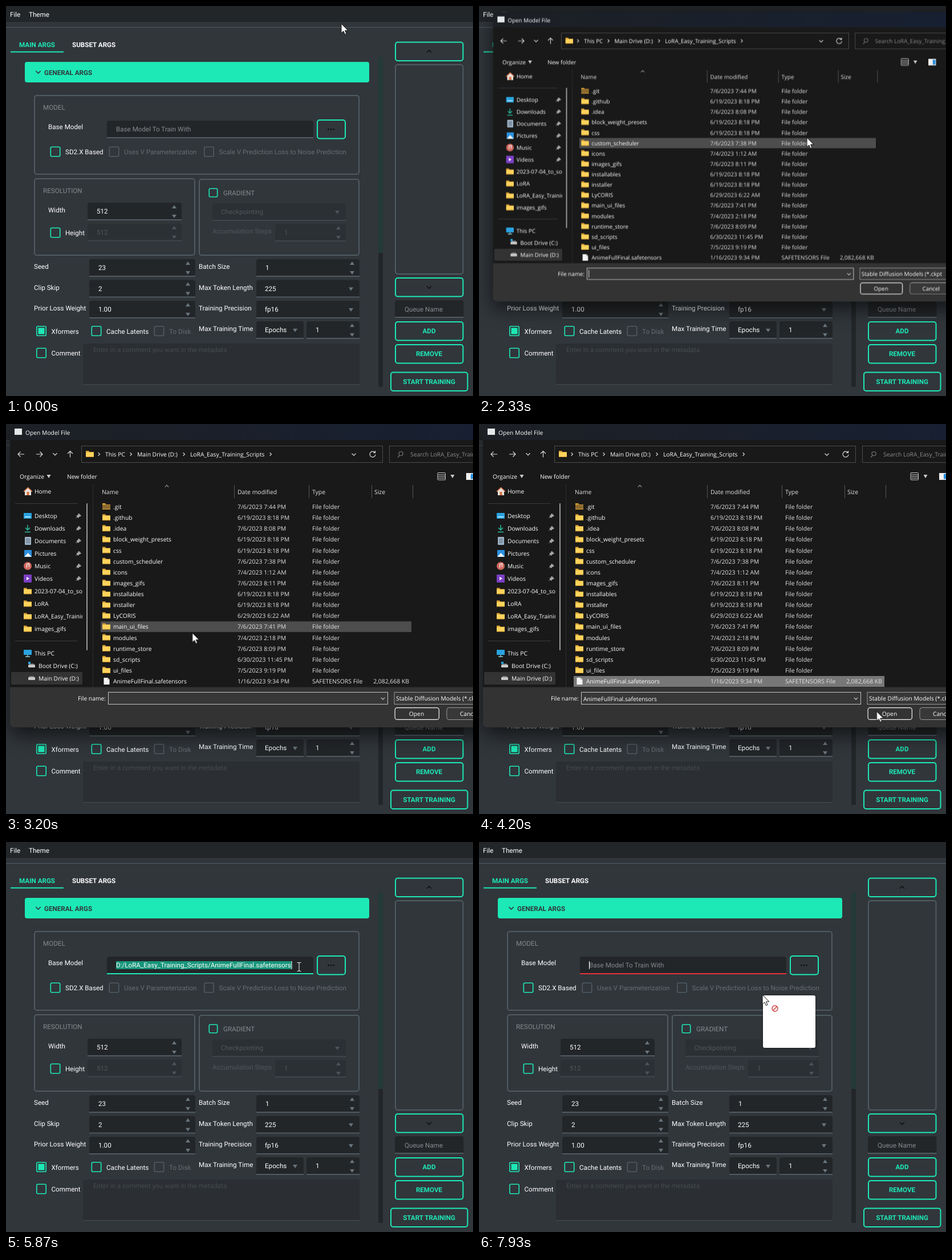
Write an HTML page that moves like this. It is 819 px wide and 684 px high and loops after 8000 ms.

```html
<!DOCTYPE html>
<html lang="en">
<head>
<meta charset="utf-8">
<title>Training UI</title>
<style>
html, body { margin: 0; width: 100%; height: 100%; overflow: hidden; background: #31363b; }
svg { display: block; }
text { white-space: pre; text-rendering: geometricPrecision; }
.app text { font: 11.65px Roboto, sans-serif; fill: #fff; }
.app .b { font-weight: 700; }
.app .teal { fill: #1de9b6; }
.app .dark { fill: #31363b; }
.app .mute { fill: #858a8e; }
.app .off { fill: #666c71; }
.app .dim { fill: #50565b; }
.app .faint { fill: #464b50; }
.dlg text { font: 10.3px "Open Sans", "Noto Sans", sans-serif; fill: #fff; }
.dlg .gray { font-size: 10.45px; fill: #e2e2e2; }
.dlg .hint { fill: #8b8b8b; }
.dlg { transform-origin: 393px 231px; animation: dlg 8s linear infinite; }
.shade { filter: drop-shadow(0 12px 18px rgba(0, 0, 0, .65)); }
.cur { animation: cur 8s linear infinite; }
.row { animation: row 8s step-end infinite, rowOn 8s step-end infinite; }
@keyframes dlg {
  0%, 27.5% { opacity: 0; transform: scale(.92); }
  28.75% { opacity: 1; transform: scale(.945); }
  29.125% { opacity: 1; transform: scale(.954); }
  31.625%, 57.5% { opacity: 1; transform: scale(1); }
  58.375% { opacity: .45; transform: scale(.967); }
  59.25%, 100% { opacity: 0; transform: scale(.94); }
}
</style>
</head>
<body>
<svg id="stage" width="819" height="684" viewBox="0 0 819 684"></svg>
<script>
const LOOP = 8000, TEAL = '#1de9b6', LINE = '#4f5b62', FIELD = '#232629';
const pct = ms => (ms / LOOP * 100).toFixed(3) + '%';
const frames = (name, list) => `@keyframes ${name}{${list.map(([ms, rule]) => `${pct(ms)}{${rule}}`).join('')}}`;

// Visibility that flips at each listed time
const flip = (name, first, times) =>
  frames(name, [0, ...times].map((ms, i) => [ms, `opacity:${(i % 2) ^ first}`]));
const on = (name, body) => `<g style="animation:${name} 8s step-end infinite">${body}</g>`;

const rowStep = 19.125;
const rowAt = (ms, n, steps) =>
  [ms, `transform:translateY(${n * rowStep}px)` + (steps ? `;animation-timing-function:steps(${steps},end)` : '')];

const path = [
  [0, 588, 31], [30, 588, 31], [300, 410, 235], [400, 346, 279], [530, 372, 217], [620, 372, 217],
  [1470, 606, 214], [1490, 606, 214], [1670, 577, 213], [1850, 577, 213], [2330, 575, 231],
  [2530, 572, 205], [2650, 572, 205], [3200, 327, 366], [3470, 258, 481], [3500, 258, 481],
  [3650, 246, 436], [3780, 244, 452], [3850, 244, 452], [4200, 697, 504], [4330, 738, 508],
  [4380, 738, 508], [4670, 762, 389], [5200, 583, 236], [5250, 583, 236], [5480, 514, 219],
  [6450, 514, 219], [6670, 687, 330], [7600, 722, 600], [7660, 722, 600], [7930, 497, 268], [8000, 497, 268]
];

const css = [
  frames('cur', path.map(([ms, x, y]) => [ms, `transform:translate(${x}px,${y}px)`])),
  frames('row', [rowAt(0, 5), rowAt(2480, 4), rowAt(2530, 3), rowAt(2635, 3, 9), rowAt(3222, 12, 4),
    rowAt(3407, 16), rowAt(3630, 15), rowAt(3730, 16)]),
  flip('rowOn', 1, [3460, 3560, 3850]),
  flip('picked', 0, [3850]),
  flip('opened', 0, [4400]),
  flip('nameCaret', 0, [2200, 2650]),
  flip('hint', 1, [4600, 6480]),
  flip('value', 0, [4600, 6480]),
  flip('focus', 0, [5540, 6480]),
  flip('endCaret', 0, [5865, 6465]),
  flip('error', 0, [6480]),
  flip('startCaret', 0, [6480, 7530, 7720]),
  flip('button', 0, [1860, 5540]),
  flip('scroll', 0, [4960, 5025, 6595, 6665]),
  flip('arrow', 1, [480, 1227, 5397, 6482, 6725, 7660]),
  flip('beam', 0, [480, 1227, 5397, 6482]),
  flip('drag', 0, [7660])
].join('');

// Shapes
const T = (x, y, s, cls = '', anchor = 'start') =>
  `<text x="${x}" y="${y + 4}" class="${cls}" text-anchor="${anchor}">${s}</text>`;
const R = (x, y, x2, y2, fill, extra = '') =>
  `<rect x="${x}" y="${y}" width="${x2 - x}" height="${y2 - y}" fill="${fill}" ${extra}/>`;
const box = (x, y, x2, y2, color, w = 2, r = 4, fill = 'none') =>
  R(x + w / 2, y + w / 2, x2 - w / 2, y2 - w / 2, fill, `stroke="${color}" stroke-width="${w}" rx="${r}"`);
const P = (d, color, w = 1.2, fill = 'none') =>
  `<path d="${d}" stroke="${color}" stroke-width="${w}" fill="${fill}"/>`;
const tri = (x, y, dir, color, w = 4) =>
  P(`M${x - w} ${y - 3 * dir}h${2 * w}l${-w} ${6 * dir}z`, 'none', 0, color);
const chev = (x, y, dx, dy, color, w = 1.2) => dx
  ? P(`M${x - dx / 2} ${y - Math.abs(dx)}l${dx} ${Math.abs(dx)}l${-dx} ${Math.abs(dx)}`, color, w)
  : P(`M${x - Math.abs(dy)} ${y - dy / 2}l${Math.abs(dy)} ${dy}l${Math.abs(dy)} ${-dy}`, color, w);

// Main window
const field = (x, y, x2, y2, off) =>
  P(`M${x} ${y2}V${y + 4}q0-4 4-4H${x2 - 4}q4 0 4 4V${y2}z`, 'none', 0, off ? '#2b3034' : FIELD) +
  R(x, y2 - 2, x2, y2, off ? '#3f464b' : LINE);
const spin = (x, y, x2, val, off) => field(x, y, x2, y + 31, off) + T(x + 16, y + 15, val, off && 'dim') +
  tri(x2 - 13, y + 7, -1, off ? '#4b545a' : '#69757c') + tri(x2 - 13, y + 24, 1, off ? '#4b545a' : '#69757c');
const combo = (x, y, x2, val, off) => field(x, y, x2, y + 31, off) + T(x + 15, y + 15, val, off && 'dim') +
  tri(x2 - 15, y + 16, 1, off ? '#4b545a' : '#69757c');
const check = (x, y, label, off, r = 9) =>
  box(x - r, y - r, x + r, y + r, off ? LINE : TEAL, 1.6, 2) + T(x + r + 8.5, y + .5, label, off && 'off');
const push = (x, y, x2, label) =>
  box(x, y, x2, y + 34.5, TEAL) + T(742, y + 17, label, 'b teal', 'middle');

const baseField = field(177, 201, 539, 232) +
  on('hint', T(193, 216, 'Base Model To Train With', 'mute')) +
  on('focus', R(177, 230, 539, 232, TEAL) + R(193, 209, 501, 223, '#17957a')) +
  on('value', T(193, 216, 'D:/LoRA_Easy_Training_Scripts/AnimeFullFinal.safetensors')) +
  on('endCaret', R(500.5, 209, 501.5, 223, '#fff')) +
  on('error', R(177, 230, 539, 232, '#e53238')) +
  on('startCaret', R(193, 209, 194, 223, '#fff'));

const app = `<g class="app">
${R(0, 0, 819, 684, '#31363b')}${R(0, 0, 819, 28, FIELD)}${R(0, 37, 819, 38, LINE)}
${T(7, 14.5, 'File')}${T(40, 14.5, 'Theme')}
${T(23, 67.5, 'MAIN ARGS', 'b teal')}${T(116, 67.5, 'SUBSET ARGS', 'b')}${R(8, 79.5, 101, 81.5, TEAL)}
${R(33, 98, 637, 134, TEAL, 'rx="4"')}${chev(56.5, 116, 0, 4.2, '#31363b', 1.5)}${T(67, 116.5, 'GENERAL ARGS', 'b dark')}
${box(49, 156, 620, 296, LINE)}${T(65, 177.5, 'MODEL', 'mute')}${T(74, 211.5, 'Base Model')}${baseField}
${on('button', R(546, 200, 595, 233, TEAL, 'rx="3" opacity=".42"'))}${box(545, 199, 596, 233.5, TEAL)}
${[565.5, 570, 574.5].map(x => R(x - 1.2, 215, x + 1.2, 217.4, '#0c0d0e')).join('')}
${check(86.5, 255.5, 'SD2.X Based')}${check(189.5, 255.5, 'Uses V Parameterization', 1)}
${check(356, 255.5, 'Scale V Prediction Loss to Noise Prediction', 1)}
${box(49, 302, 332, 438, LINE)}${T(65, 323.5, 'RESOLUTION', 'mute')}${T(74, 357.5, 'Width')}
${spin(143, 345, 308, '512')}${check(86.5, 397.5, 'Height')}${spin(143, 381.5, 308, '512', 1)}
${box(338, 303, 620, 438, LINE)}${check(363.5, 327.5, '', 0, 8)}${T(381, 328, 'GRADIENT', 'mute')}
${combo(362, 346, 596, 'Checkpointing', 1)}${T(362, 395, 'Accumulation Steps', 'dim')}${spin(472, 382, 596, '1', 1)}
${T(49, 457, 'Seed')}${spin(146, 444, 332, '23')}${T(49, 493.5, 'Clip Skip')}${spin(146, 480.5, 332, '2')}
${T(49, 530, 'Prior Loss Weight')}${spin(146, 517, 332, '1.00')}
${T(338, 457, 'Batch Size')}${spin(439, 444, 620, '1')}${T(338, 493.5, 'Max Token Length')}${combo(439, 480.5, 620, '225')}
${T(338, 530, 'Training Precision')}${combo(439, 517, 620, 'fp16')}
${T(338, 566, 'Max Training Time')}${combo(439, 553, 522, 'Epochs')}${spin(527, 553, 620, '1')}
${check(62, 570, 'Xformers')}${R(56.5, 564.5, 67.5, 575.5, TEAL)}${check(158.5, 570, 'Cache Latents')}
${check(268.5, 570, 'To Disk', 1)}${check(62, 608.5, 'Comment')}
${R(135, 592, 620, 664, '#2b2f33', 'rx="3"')}${R(135, 663, 620, 664.5, '#3f464b')}
${T(153, 603, 'Enter in a comment you want in the metadata', 'faint')}
${R(653, 89, 661, 668, FIELD)}${R(653, 89, 661, 433, '#233a38')}${on('scroll', R(653, 89, 661, 433, TEAL))}
${push(682, 62.5, 802.5, '')}${chev(742, 79.5, 0, -4, '#0c0d0e', 1.4)}${box(682, 102, 802.5, 471, LINE)}
${push(682, 476, 802.5, '')}${chev(742, 493.5, 0, 4, '#0c0d0e', 1.4)}
${field(682, 516, 802.5, 547)}${T(699, 532, 'Queue Name', 'mute')}
${push(682, 553, 802.5, 'ADD')}${push(682, 593, 802.5, 'REMOVE')}${push(674, 641.5, 810.5, 'START TRAINING')}
</g>`;

// File dialog
const folder = (x, y, color = '#ffd35c') =>
  P(`M${x} ${y - 5}h5l1.5 2h7.5v9h-14z`, 'none', 0, '#d9a033') + R(x, y - 2.5, x + 14, y + 5, color, 'rx="1"');
const pin = y => P(`M122.5 ${y + 4}l3-3m-2-2l4 4m0-7l4 4l-3 1.5l-2 2l-2.5-2.5l2-2z`, '#a5a5a5', 1, '#a5a5a5');
const files = [
  ['.git', '7/6/2023 7:44 PM'], ['.github', '6/19/2023 8:18 PM'], ['.idea', '7/6/2023 8:08 PM'],
  ['block_weight_presets', '6/19/2023 8:18 PM'], ['css', '6/19/2023 8:18 PM'], ['custom_scheduler', '7/6/2023 7:38 PM'],
  ['icons', '7/4/2023 1:12 AM'], ['images_gifs', '7/6/2023 8:11 PM'], ['installables', '6/19/2023 8:18 PM'],
  ['installer', '6/19/2023 8:18 PM'], ['LyCORIS', '6/29/2023 6:22 AM'], ['main_ui_files', '7/6/2023 7:41 PM'],
  ['modules', '7/4/2023 2:18 PM'], ['runtime_store', '7/6/2023 8:09 PM'], ['sd_scripts', '6/30/2023 11:45 PM'],
  ['ui_files', '7/5/2023 9:19 PM'], ['AnimeFullFinal.safetensors', '1/16/2023 9:34 PM']
];
const list = files.map(([name, date], i) => {
  const y = 145 + i * rowStep, file = i === 16;
  const icon = file
    ? P(`M171.5 ${y - 6}h7l3 3v9h-10z`, 'none', 0, '#f4f4f4') + P(`M178.5 ${y - 6}v3h3`, '#999', .8)
    : folder(169, y - 1, i ? undefined : '#8d6b2e');
  return icon + T(188, y, name) + T(406, y, date, 'gray') + T(537, y, file ? 'SAFETENSORS File' : 'File folder', 'gray') +
    (file ? T(707, y, '2,082,668 KB', 'gray', 'end') : '');
}).join('');

const nav = [
  ['Desktop', R(31, 156, 45, 166, '#2aa3e0', 'rx="1"') + R(33, 162, 43, 164, '#a8e2ff')],
  ['Downloads', P('M38 177v9m-4-4l4 4l4-4M33 189.5h10', '#2bc0a0', 1.5)],
  ['Documents', R(33, 198, 44, 212, '#9fb4c6', 'rx="1"') + P('M35 202h7m-7 3h7m-7 3h7', '#44586a', 1)],
  ['Pictures', R(32, 221, 45, 233, '#2b8fdd', 'rx="1"') + P('M32 233l6.5-7l6.5 7z', 'none', 0, '#eaf6ff')],
  ['Music', '<circle cx="38" cy="249" r="7" fill="#d0695f"/>' + P('M36.5 252v-6l4-1v6', '#fff', 1.2)],
  ['Videos', R(31, 264, 45, 278, '#7b3fc4', 'rx="1"') + P('M36 268l5 3l-5 3z', 'none', 0, '#fff')]
].map(([name, icon], i) => icon + T(50, 161 + i * 22, name) + pin(161 + i * 22)).join('');
const quick = ['2023-07-04_to_sort', 'LoRA', 'LoRA_Easy_Training_Scripts', 'images_gifs']
  .map((s, i) => folder(31, 292.5 + i * 22) + T(50, 292.5 + i * 22, s)).join('');
const drive = y => R(39, y - 1, 51, y + 4, '#c8c8c8', 'rx="1"') + P(`M41 ${y - 2}h8`, '#909090', 1.5);

const dialog = `<g class="dlg">
<clipPath id="nav"><rect x="8" y="106" width="126" height="355"/></clipPath>
<linearGradient id="bar"><stop offset="0" stop-color="#1d2025"/><stop offset="1" stop-color="#172033"/></linearGradient>
<g class="shade">${R(7, 0, 900, 532, '#333', 'rx="7"')}</g>
${R(7, 0, 900, 60, 'url(#bar)', 'rx="7"')}${R(7, 28, 900, 462, '#191919')}
${R(15, 8, 28, 19, '#e4e8e8')}${T(34, 14.5, 'Open Model File')}
${P('M32 53h-11m4.5-4.5l-4.5 4.5l4.5 4.5', '#ddd')}${P('M53 53h11m-4.5-4.5l4.5 4.5l-4.5 4.5', '#ddd')}
${chev(86, 53, 0, 3.5, '#ddd')}${P('M112.5 58.5v-11m-4.5 4.5l4.5-4.5l4.5 4.5', '#ddd')}
${box(132, 38, 661, 68, '#4b4b4b', 1, 0)}${folder(140, 52)}
${[163, 219, 312, 464].map(x => chev(x, 53, 2.8, 0, '#ddd')).join('')}
${T(174, 53, 'This PC')}${T(230, 53, 'Main Drive (D:)')}${T(323, 53, 'LoRA_Easy_Training_Scripts')}
${chev(610, 53.5, 0, 3.5, '#ddd')}${P('M647 50a5 5 0 1 0 1 3.5m-.5-6.5v3.5h-3.5', '#ddd')}
${box(672, 38, 890, 68, '#4b4b4b', 1, 0)}${P('M690 55.5l-3 3M689 52a3.5 3.5 0 1 1 7 0a3.5 3.5 0 1 1-7 0', '#777')}
${T(709, 53, 'Search LoRA_Easy_Training_Scripts', 'hint')}
${T(24, 92, 'Organize')}${tri(75, 92, 1, '#ccc', 3.5)}${T(107, 92, 'New folder')}
${box(756.5, 85, 771, 98.5, '#ccc', 1, 1)}${P('M758 89h12m-12 3h12m-12 3h12', '#ccc', 1)}${tri(783, 92, 1, '#ccc', 3.5)}
${R(807, 86, 821, 98, '#f0f0f0')}${R(815, 87.5, 820, 96.5, '#2b8fdd')}<circle cx="846" cy="92" r="6" fill="#3aa0e8"/>
${P('M31.5 118.5l7-6.5l7 6.5h-1.5v6.5h-11v-6.5z', 'none', 0, '#e9e2dc')}${P('M31 118.5l7.5-7l7.5 7', '#e0784a', 1.6)}${R(36.5, 119, 40.5, 125, '#d9713f')}
${T(50, 118, 'Home')}${R(16, 139, 126, 140, '#3b3b3b')}${R(16, 380, 126, 381, '#3b3b3b')}
${nav}<g clip-path="url(#nav)">${quick}</g>${R(141, 139, 143, 397, '#9b9b9b', 'rx="1"')}${R(152, 106, 153, 461, '#2e2e2e')}
${R(31, 396, 45, 405, '#2aa3e0', 'rx="1"')}${P('M38 405v3m-4 0h8', '#9cc', 1.3)}${T(50, 402, 'This PC')}
${drive(423)}${R(39, 417, 43, 421, '#2aa3e0')}${T(57, 424, 'Boot Drive (C:)')}
${R(9, 435, 134, 457, '#333', 'rx="2"')}${drive(445)}${T(57, 446, 'Main Drive (D:)')}
${chev(282, 109, 0, -3.2, '#999')}${[400, 531, 641, 713].map(x => R(x, 107, x + 1, 130, '#555')).join('')}
${T(168, 118.5, 'Name', 'gray')}${T(406, 118.5, 'Date modified', 'gray')}${T(537, 118.5, 'Type', 'gray')}${T(646, 118.5, 'Size', 'gray')}
<rect class="row" x="166" y="135.8" width="545" height="19" fill="#4d4d4d"/>
${on('picked', R(166, 442, 711, 461, '#777'))}${list}
${R(7, 461.5, 900, 520, '#333')}
${T(175, 481, 'File name:', '', 'end')}${box(179, 470, 670, 492, '#c4c4c4', 1, 0, '#373737')}${chev(661, 481.5, 0, 3.2, '#ccc')}
${on('nameCaret', R(182.5, 474, 183.5, 488, '#eee'))}
${on('opened', R(182, 474, 313, 488.5, '#e02a3a'))}${on('picked', T(183, 481.5, 'AnimeFullFinal.safetensors'))}
${box(680.5, 470, 870, 492, '#9a9a9a', 1, 0, '#373737')}${T(684, 481, 'Stable Diffusion Models (*.ckpt')}
${box(681.5, 497, 760, 519, '#f4f4f4', 1.2, 4, '#333')}${on('opened', R(681, 496.5, 760.5, 519.5, '#787878', 'rx="4"'))}
${T(720, 508, 'Open', '', 'middle')}${box(772.5, 497, 852, 519, '#9a9a9a', 1, 4, '#383838')}${T(796, 508, 'Cancel')}
</g>`;

const cursor = `<g class="cur">
${on('drag', R(1, 1, 93, 93, '#fff', 'rx="3" style="filter:drop-shadow(0 0 1.5px #0009)"') +
  '<circle cx="22" cy="24" r="5" fill="none" stroke="#cf3b3b" stroke-width="1.4"/>' + P('M18.5 27.5l7-7', '#cf3b3b', 1.4))}
${on('arrow', P('M0 0V16.5L3.8 13L6.4 18.7L9 17.5L6.5 12H11.8Z', '#111', 1, '#fff'))}
${on('beam', P('M-3.5-7.5h2.5l1 1l1-1h2.5M-3.5 7.5h2.5l1-1l1 1h2.5M0-6.5v13', '#e8e8e8', 1.1))}
</g>`;

const style = document.createElement('style');
style.textContent = css;
document.head.append(style);
document.getElementById('stage').innerHTML = app + dialog + cursor;
</script>
</body>
</html>
```
